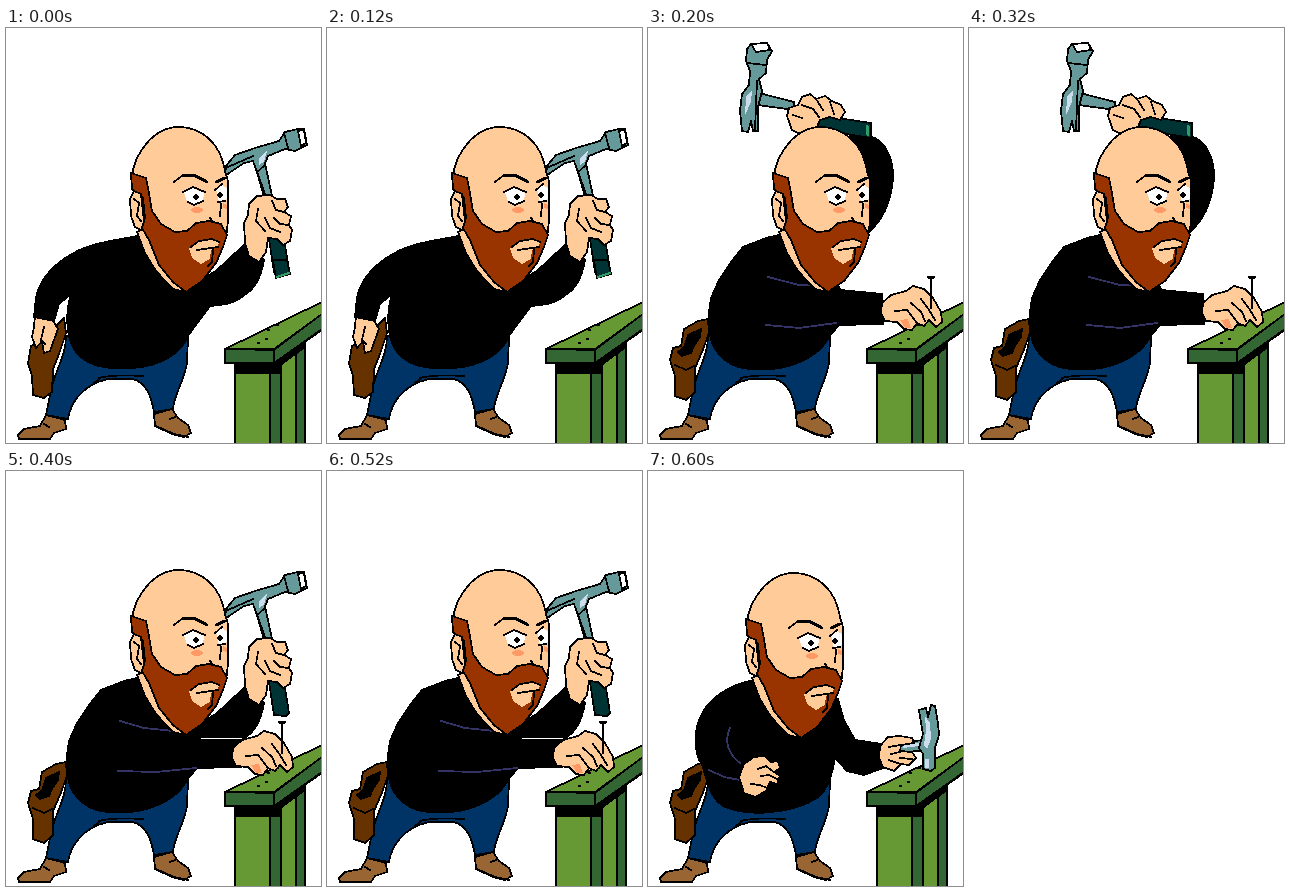
An HTML page for the animation above (800 ms loop, 315x415 px).

```html
<!DOCTYPE html>
<html lang="en">
<head>
<meta charset="utf-8">
<title>Carpenter</title>
<style>
html, body { margin: 0; width: 100%; height: 100%; overflow: hidden; background: #fff; }
svg { display: block; width: 100%; height: 100%; }
path, ellipse, circle { stroke: #000; stroke-width: 1.8; stroke-linejoin: round; stroke-linecap: round; }
.skin { fill: #fc9; }
.hair { fill: #930; }
.black { fill: #000; }
.blue { fill: #036; }
.shoe { fill: #963; }
.bag { fill: #630; }
.steel { fill: #699; }
.shine { fill: #cde; stroke: none; }
.grip { fill: #033; }
.leaf { fill: #693; }
.moss { fill: #363; }
.white { fill: #fff; }
.bare { stroke: none; }
.line { fill: none; }
.fold { fill: none; stroke: #336; }
.blush { fill: #f96; stroke: none; }
</style>
</head>
<body>
<svg viewBox="0 0 315 415" preserveAspectRatio="none" shape-rendering="crispEdges">

  <!-- legs -->
  <path class="blue" d="M60 308C60 328 49 343 45 362L40 387L62 391C65 374 76 361 92 354L102 351L127 351C140 355 145 367 148 384L167 381C168 366 178 354 181 335L182 309Z"/>
  <path class="line" stroke-width="2" d="M93 350C104 347 120 347 137 348M88 355L96 349"/>
  <path class="shoe" d="M40 387L59 392L60 401L48 405L44 411H13L12 407L18 401L34 398Z"/>
  <path class="shoe" d="M148 386L166 381L172 390L182 397L185 405L178 409L166 406L149 398Z"/>
  <path class="line" d="M13 411H43M38 396L43 399M150 398L168 406L182 409M164 391L169 389"/>

  <!-- tool bag -->
  <path data-on="0" class="bag" d="M58 290L60 305L53 326L47 341L46 364L38 370L27 367L26 348L22 335L25 318L38 310Z"/>
  <g data-on="123">
    <path class="bag" d="M36 301L50 293L60 291L61 305L54 324L47 340L47 364L38 372L27 368L27 348L22 332L25 320L33 318Z"/>
    <path class="black" d="M40 307L53 301L52 309L46 318L43 325L34 328L30 324L36 319Z"/>
    <path class="line" d="M27 337L38 342L46 338"/>
  </g>

  <!-- raised arm and hammer -->
  <g data-on="1">
    <path class="black" d="M202 104L222 108C239 113 246 134 245 151C243 175 234 193 220 205L207 203Z"/>
    <path class="steel" d="M111 65L146 74L146 82L110 77Z"/>
    <path class="steel" d="M99 21L103 16L119 15L124 23L119 32L118 45L111 51L114 63L110 79L110 103L105 103L103 93L100 104L94 103L92 83L94 66L101 57L102 43L98 33Z"/>
    <path class="white" d="M103 16L119 15L122 22L108 24Z"/>
    <path class="shine" d="M98 69L104 62L103 74L97 87Z"/>
    <path class="line" d="M99 35L118 37M109 53L107 102"/>
    <path class="grip" d="M172 88L190 90L223 95L223 110L199 106L170 99Z"/>
    <path d="M219 98L220 107" style="stroke:#396;stroke-width:3"/>
    <path class="skin" d="M139 88L141 80L150 77L154 69L162 66L168 71L177 68L184 73L193 77L197 84L192 92L182 89L172 92L168 101L154 107L144 102Z"/>
    <path class="line" d="M154 77L165 81L171 89M168 71L175 82M182 74L186 86M145 87L154 90"/>
  </g>
  <g data-on="02">
    <path class="black" d="M239 216L258 232C255 250 248 262 238 267C230 276 215 277 204 278L196 286L178 263L211 242Z"/>
    <path class="steel" d="M247 130L257 126L266 168L274 205H262L260 176Z"/>
    <path class="steel" d="M219 148L220 138L229 127L249 120L273 113L279 104L292 101L298 101L301 117L289 123L279 121L262 128L258 138L251 144L247 133L238 135L226 143Z"/>
    <path class="white" d="M292 103L298 102L300 115L295 118Z"/>
    <path class="shine" d="M253 130L261 123L258 134L253 137Z"/>
    <path class="line" d="M222 139L247 128M278 105L282 120M251 144L262 174"/>
    <path class="grip" d="M261 198L277 204L283 242L280 245L268 244Z"/>
    <path class="skin" d="M238 195L242 187L243 176L251 168L264 167L271 171L279 171L282 179L278 184L285 188L283 197L286 202L284 213L277 217L271 211L262 210L260 224L253 234L243 228L239 215Z"/>
    <path class="line" d="M252 181L250 193L259 203M266 173L270 182L278 184M268 190L274 196L283 197M259 190L264 200L274 204"/>
  </g>
  <path data-on="0" class="grip" d="M267 232L281 232L284 246L270 250Z"/>
  <path data-on="0" d="M271 249L283 245" style="stroke:#396;stroke-width:2"/>

  <!-- bench -->
  <path class="moss" d="M263 334L299 308V416H264Z"/>
  <path class="leaf" d="M229 338H264V416H229Z"/>
  <path class="leaf" d="M275 331L290 322V416H275Z"/>
  <path class="black" d="M229 336H266L299 314V319L273 338V345H229Z"/>
  <path class="leaf" d="M219 321L316 274V286L268 321Z"/>
  <path class="moss" d="M268 322L316 286V302L268 335Z"/>
  <path class="moss" d="M219 321L268 322V335H219Z"/>
  <path class="line" d="M219 335H268L316 301"/>
  <path class="line" style="stroke-width:2.5" d="M252 315H253M260 311H261M262 302H263M271 297H272"/>

  <!-- torso -->
  <g data-on="0">
    <path class="skin" d="M29 288L46 291L52 301L48 312L44 323L38 325L36 313L30 320L26 309L28 299Z"/>
    <path class="line" d="M38 299L35 312L39 316"/>
    <path class="black" d="M131 208C112 212 83 215 66 226C46 237 33 253 30 270L28 289L48 293L53 276L65 266C60 282 59 306 68 321C79 339 102 342 127 340C156 338 176 324 182 308C190 297 199 284 206 276L190 242L150 214Z"/>
  </g>
  <path data-on="12" class="black" d="M131 207L118 210L95 219L83 234L71 252L63 270C59 292 59 312 70 325C79 336 91 341 105 341C140 344 170 330 181 309L191 297L235 296L234 266L193 262L166 222Z"/>
  <path data-on="1" class="fold" d="M120 249L151 257L174 258M118 297L151 300L188 295"/>
  <g data-on="2">
    <path class="fold" d="M114 250L138 257L177 261M112 300L150 301L190 297"/>
    <path d="M195 267H236" style="stroke:#fff;stroke-width:1"/>
  </g>
  <g data-on="3">
    <path class="black" d="M106 209C80 214 60 228 53 245C46 258 45 281 54 294C59 307 60 325 75 335C101 347 145 342 169 327C180 319 184 304 187 287L199 300L216 304L235 297L234 273L207 269L196 249L190 228L143 215Z"/>
    <path class="fold" d="M82 257C76 270 80 283 92 292M61 299L76 306L92 309"/>
    <path class="skin" d="M91 306L96 293L106 286L117 285L123 291L130 290L132 297L126 301L132 305L129 313L122 311L118 320L107 326L96 322Z"/>
    <path class="line" d="M110 298L118 295L126 301M113 305L121 304L129 308M103 313L112 314L119 317"/>
  </g>

  <!-- head -->
  <g id="head">
    <path class="skin" d="M131 204L140 199L171 246L180 264L167 261L150 243L139 225Z"/>
    <path class="skin" d="M126 148C128 129 145 99 173 99C197 99 215 117 219 143L222 153V190L221 204L185 223L148 210L135 199L134 163Z"/>
    <path class="hair" d="M125 145L140 150L143 165L146 183L155 196L169 204L181 203L190 195L203 193L215 196L221 207L217 219L210 235L196 253L180 264L167 254L153 237L143 212L136 200L139 190L137 170L126 161Z"/>
    <path class="skin" d="M135 166L128 163L124 171L125 188L129 199L135 202L138 193Z"/>
    <path class="line" d="M128 171L133 175L131 188L135 193"/>
    <path class="skin bare" d="M183 220L192 213L206 211L213 213L212 219L205 222L204 231L195 236L186 230Z"/>
    <path class="line" d="M185 219L193 213L206 211L213 214M191 222L212 219M207 222L206 234L202 238"/>
    <ellipse class="blush" cx="191" cy="182" rx="6" ry="3"/>
    <path class="white bare" d="M178 164L187 160L198 165L197 173L187 176L181 173Z"/>
    <path class="white bare" d="M210 161L216 157L221 160V171L213 174Z"/>
    <circle class="black" cx="190" cy="169" r="1.7"/>
    <circle class="black" cx="214" cy="167" r="1.7"/>
    <path class="line" style="stroke-width:3" d="M176 148L188 147L201 154M210 154L219 150"/>
    <path class="line" d="M168 154L176 148M177 164L187 159L199 164M182 174L188 177L197 173M209 162L216 156M212 174L219 173M215 176L214 188M204 190L207 194"/>
    <path class="blush" d="M217 175L221 177V181L217 180Z"/>
  </g>

  <!-- hand holding the nail -->
  <g id="hold" data-on="12">
    <path class="skin" d="M234 275L243 267L258 263L265 258L276 261L285 270L293 284L294 294L288 299L281 292L276 298L269 295L264 302L256 301L249 294L237 293L233 285Z"/>
    <path class="blush" d="M252 292L260 291L263 300L257 300Z"/>
    <path class="line" d="M247 283L259 282L269 295M263 275L273 284L277 293M273 271L281 282L287 292"/>
    <path class="line" style="stroke-width:2" d="M283 249V280"/>
    <path class="line" style="stroke-width:3" d="M280 249H286"/>
  </g>

  <!-- hammer blow -->
  <g data-on="3">
    <path class="steel" d="M250 272L275 269V280L251 281Z"/>
    <path class="steel" d="M271 239L278 237L280 246L283 234L287 235L290 252L291 264L287 277L287 297L283 300L275 298L275 283L271 277L275 263Z"/>
    <path class="shine" d="M277 245L282 252L283 268L279 278L276 274L278 259ZM277 288H281V297H277ZM255 274L271 272V275L255 277Z"/>
    <path class="skin" d="M232 275L240 266L252 265L264 267L266 272L253 274L252 280L264 281L268 287L261 294L253 293L246 300L235 296L231 287Z"/>
    <path class="line" d="M241 276L252 274M243 283L252 281M252 287L264 288M241 289L252 293"/>
  </g>
</svg>

<script>
const STEP = 200, COUNT = 4;

// Plays one value per step, with hard changes.
function play(el, prop, values) {
  const frames = [...values, values[0]].map((v, i) => ({
    [prop]: v, offset: i / COUNT, easing: 'step-end'
  }));
  el.animate(frames, { duration: STEP * COUNT, iterations: Infinity }).startTime = 0;
}

const shift = (x, y) => `translate(${x}px, ${y}px)`;
const rest = shift(0, 0);

for (const el of document.querySelectorAll('[data-on]')) {
  play(el, 'visibility', [0, 1, 2, 3].map(i =>
    el.dataset.on.includes(i) ? 'visible' : 'hidden'));
}
play(document.getElementById('head'), 'transform', [rest, rest, rest, shift(-27, 3)]);
play(document.getElementById('hold'), 'transform', [rest, rest, shift(-7, 2), rest]);
</script>
</body>
</html>
```
